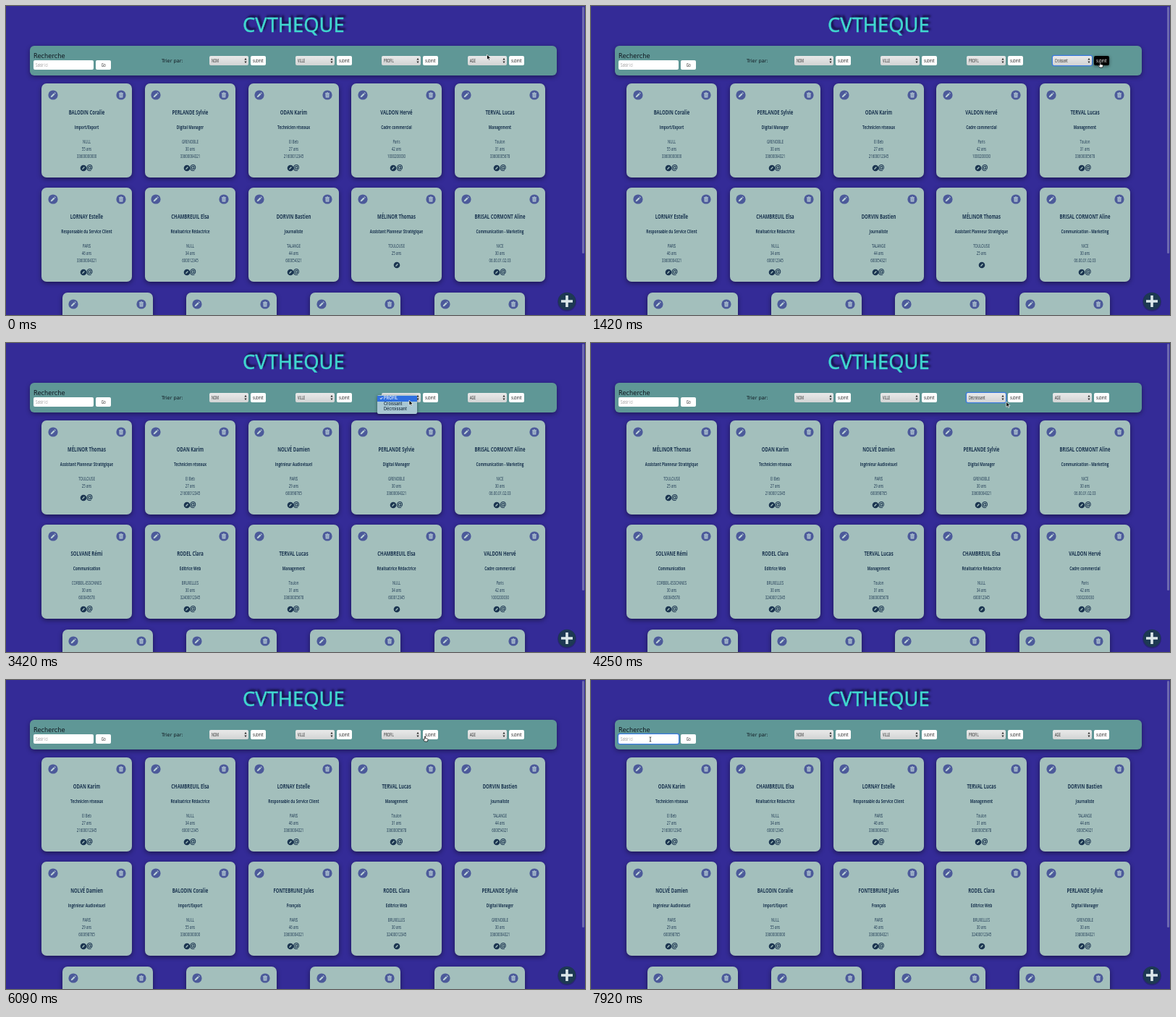
An HTML page for the animation above (8000 ms loop, 800 px wide and 427 px high).

```html
<!DOCTYPE html>
<html lang="fr">
<head>
<meta charset="utf-8">
<title>CVTHEQUE</title>
<style>
html, body { margin: 0; width: 100%; height: 100%; overflow: hidden; background: #342b97; }
#stage { position: relative; width: 800px; height: 427px; overflow: hidden; color: #1b3550;
  font: 6.9px/10px "Open Sans", "Noto Sans", sans-serif; }
#stage div, #stage svg { position: absolute; box-sizing: border-box; white-space: nowrap; }
#title { left: 327px; top: 6px; font: 27.3px/40px "Noto Sans", sans-serif; color: #40d8cf;
  -webkit-text-stroke: .4px #40d8cf; text-shadow: 3px -3px 3px #0c0c30; }
#bar { left: 33px; top: 55px; width: 728px; height: 41px; border-radius: 6px; background: #5f9796;
  box-shadow: 0 2px 6px #0006; }
.label { color: #101820; font-family: "DejaVu Sans", sans-serif; }
.narrow { display: inline-block; transform: scaleX(.64); }
.box { display: flex; justify-content: center; height: 13px; line-height: 13px; border-radius: 2px;
  background: #fff; color: #222; font-size: 7px; }
#search, .select { justify-content: flex-start; padding-left: 3px; }
#search .narrow, .select .narrow { transform-origin: left; }
#search { left: 38px; top: 75px; width: 83px; color: #999; }
.select { top: 69px; width: 54px; background: linear-gradient(#e9e9e9, #d2d4d4); font-size: 6.4px; }
.select svg { right: 2px; top: 3px; }
.submit { top: 69px; width: 21px; }
.submit.hover { background: #000; color: #fff; box-shadow: 0 1px 4px #0008; }
.focus { box-shadow: 0 0 0 1.3px #3c7be0; }
.card { width: 125px; height: 130px; border-radius: 7px; background: #a3bfbc; box-shadow: 0 2px 6px #0007; }
.card .narrow { width: 100%; text-align: center; }
.card .name { top: 33px; font-size: 9.3px; line-height: 13px; font-weight: 700; }
.card .job { top: 55px; font-size: 7.4px; font-weight: 700; }
.card .at { left: 62px; font: 700 10px/10px "Noto Sans", sans-serif; }
#menu { top: 72px; width: 55px; height: 26px; padding-top: 1px; border-radius: 2px; background: #a9c7d3;
  box-shadow: 0 1px 4px #0007; color: #14283c; font: 500 5.6px/7.7px Inter, sans-serif; }
#menu div { position: static; padding-left: 9px; }
#menu .on { background: #2f6fe0; color: #fff; }
#menu div:first-child::before { content: "✓"; position: absolute; left: 3px; font-weight: 700; }
#thumb { left: 796px; top: 1px; width: 3px; height: 341px; border-radius: 2px; background: #6d69b0; }
</style>
</head>
<body>
<svg width="0" height="0" style="position:absolute">
  <symbol id="pencil" viewBox="-7 -7 14 14"><circle r="6.6" fill="#4c5a9a"/>
    <path d="M-3.3 3.3l.5-2.1 3.8-3.8 1.6 1.6-3.8 3.8zM1.6-3.2l.7-.6 1.6 1.6-.7.6z" fill="#b9cfd6"/></symbol>
  <symbol id="trash" viewBox="-7 -7 14 14"><circle r="6.6" fill="#4c5a9a"/>
    <path d="M-3-3.1h2l.4-.7h1.2l.4.7h2v.8h-6zM-2.6-1.8h5.2l-.3 5.4h-4.6z" fill="#b9cfd6"/>
    <path d="M-1.1-.9v3.5M0-.9v3.5M1.1-.9v3.5" stroke="#4c5a9a" stroke-width=".45"/></symbol>
  <symbol id="compass" viewBox="-5 -5 10 10"><circle r="4.3" fill="#1b3550"/>
    <path d="M-2 2l.5-1.5 2.4-2.4 1 1-2.4 2.4z" fill="#a3bfbc"/></symbol>
  <symbol id="arrows" viewBox="0 0 4 7"><path d="M2 0l1.6 2.6H.4zM2 7L.4 4.4h3.2z" fill="#222"/></symbol>
</svg>
<div id="stage">
  <div id="title">CVTHEQUE</div>
  <div id="bar"></div>
  <div class="label" style="left:38px;top:64px;font-size:8.3px">Recherche</div>
  <div class="box" id="search"><span class="narrow">Saisir ici</span></div>
  <div class="box" style="left:124px;top:75px;width:21px"><span class="narrow">Go</span></div>
  <div class="label" style="left:215px;top:71px;font-size:6.6px">Trier par:</div>
  <div id="sorts"></div>
  <div id="cards"></div>
  <div id="menu"></div>
  <div id="thumb"></div>
  <svg style="left:759px;top:392px" width="32" height="32" viewBox="-16 -16 32 32">
    <circle cy="1" r="13" fill="#0003"/><circle r="12.2" fill="#1d3953"/>
    <path d="M-8 0H8M0-8V8" stroke="#dbe8ea" stroke-width="3.6"/></svg>
  <svg id="cursor" width="16" height="16" viewBox="-5 -5 16 16">
    <path stroke-width=".7" stroke-linejoin="round"/></svg>
</div>
<script>
const $ = id => document.getElementById(id);
const icon = (id, x, y, w, h = w) =>
  `<svg style="left:${x - w / 2}px;top:${y - h / 2}px" width="${w}" height="${h}"><use href="#${id}"/></svg>`;

const people = {
  ba: ["BALODIN Coralie", "Import/Export", "NULL", 55, "33600000000"],
  pe: ["PERLANDE Sylvie", "Digital Manager", "GRENOBLE", 30, "33600004321"],
  od: ["ODAN Karim", "Technicien réseaux", "El Beb", 27, "21600012345"],
  va: ["VALDON Hervé", "Cadre commercial", "Paris", 42, "1000200030"],
  te: ["TERVAL Lucas", "Management", "Toulon", 31, "33600005678"],
  lo: ["LORNAY Estelle", "Responsable du Service Client", "PARIS", 46, "33600004321"],
  ch: ["CHAMBREUIL Elsa", "Réalisatrice Rédactrice", "NULL", 34, "600012345"],
  do: ["DORVIN Bastien", "Journaliste", "TALANGE", 44, "600054321"],
  me: ["MÉLINOR Thomas", "Assistant Planneur Stratégique", "TOULOUSE", 25, ""],
  br: ["BRISAL CORMONT Aline", "Communication - Marketing", "NICE", 30, "06.00.01.02.03"],
  no: ["NOLVÉ Damien", "Ingénieur Audiovisuel", "PARIS", 29, "600098765"],
  so: ["SOLVANE Rémi", "Communication", "CORBEIL-ESSONNES", 30, "600045678"],
  ro: ["RODEL Clara", "Editrice Web", "BRUXELLES", 30, "32400012345"],
  fo: ["FONTEBRUNE Jules", "Français", "PARIS", 46, "33600004321"],
};
const orders = [
  "ba pe od va te lo ch do me br",
  "me od no pe br so ro te ch va",
  "od ch lo te do no ba fo ro pe",
].map(s => s.split(" "));

const sorts = ["NOM", "VILLE", "PROFIL", "AGE"];
const AGE = 3, PROFIL = 2;
$("sorts").innerHTML = sorts.map((name, i) => `
  <div class="box select" style="left:${281 + 119 * i}px"><span class="narrow">${name}</span>
    <svg width="4" height="7"><use href="#arrows"/></svg></div>
  <div class="box submit" style="left:${337.5 + 119 * i}px"><span class="narrow">submit</span></div>`).join("");
const selects = [...document.querySelectorAll(".select")];
const submits = [...document.querySelectorAll(".submit")];

function card(x, y, person, single) {
  let body = "";
  if (person) {
    const [name, job, city, age, phone] = person, iconY = phone ? 116.5 : 106.5;
    body = `<div class="narrow name">${name}</div><div class="narrow job">${job}</div>` +
      [city, age + " ans", phone]
        .map((s, i) => `<div class="narrow" style="top:${75.5 + 10.2 * i}px">${s}</div>`).join("") +
      icon("compass", single ? 62.5 : 58, iconY, 10) +
      (single ? "" : `<div class="at" style="top:${iconY - 6}px">@</div>`);
  }
  return `<div class="card" style="left:${x}px;top:${y}px">` +
    icon("pencil", 15.5, 16, 14) + icon("trash", 109.5, 16, 14) + body + `</div>`;
}

const pages = orders.map(order =>
  order.map((id, i) => card(49 + 142.8 * (i % 5), i < 5 ? 107 : 251.3, people[id], i === 8)).join("") +
  [0, 1, 2, 3].map(i => card(77.6 + 171.3 * i, 395.5)).join(""));

const shapes = {
  arrow: ["M0 0V7.2L1.7 5.7 2.9 8.3 4 7.8 2.9 5.3H5.2Z", "#000", "#fff"],
  hand: ["M-.6 0Q0-.8.6 0V2.6L3.5 3.2Q4.2 3.5 4 4.5L3.3 7H-.6L-2.6 4.2Q-2.4 3.2-.6 4.3Z", "#fff", "#000"],
  beam: ["M-1.3-3.2Q0-3.2 0-2.4Q0-3.2 1.3-3.2M0-2.4V2.4M-1.3 3.2Q0 3.2 0 2.4Q0 3.2 1.3 3.2", "none", "#000"],
};

// Cursor stops: time, x, y
const path = [
  [0, 664.5, 67], [170, 664.5, 67], [420, 668, 74], [550, 668, 75], [750, 666, 84], [900, 666, 84],
  [1300, 703.5, 78], [2250, 703.5, 78], [2950, 557, 76], [3300, 557, 78], [3430, 557, 79], [3750, 552, 91],
  [3950, 552, 91], [4450, 585.5, 76], [5700, 585.5, 76], [6050, 579, 78], [6300, 579, 78],
  [7250, 82, 82], [8000, 82, 82],
];
function cursorAt(t) {
  const i = path.findIndex(p => p[0] > t), [t0, x0, y0] = path[i - 1], [t1, x1, y1] = path[i];
  const u = (t - t0) / (t1 - t0), e = u * u * (3 - 2 * u);
  return [x0 + (x1 - x0) * e, y0 + (y1 - y0) * e];
}

const within = (t, a, b) => t >= a && t < b;
let shownPage = -1;

function render(t) {
  const page = t < 1880 ? 0 : t < 5250 ? 1 : 2;
  if (page !== shownPage) $("cards").innerHTML = pages[shownPage = page];

  const [x, y] = cursorAt(t);
  const open = within(t, 480, 880) ? AGE : within(t, 3150, 3900) ? PROFIL : -1;
  const chosen = { [AGE]: within(t, 880, 1880) && "Croissant", [PROFIL]: within(t, 3900, 5250) && "Décroissant" };
  const focused = within(t, 880, 1600) ? AGE : within(t, 3900, 4850) ? PROFIL : -1;
  const overButton = i => within(x, 337.5 + 119 * i, 358.5 + 119 * i) && within(y, 69, 82);

  sorts.forEach((name, i) => {
    selects[i].firstChild.textContent = chosen[i] || name;
    selects[i].classList.toggle("focus", focused === i);
    submits[i].classList.toggle("hover", !!chosen[i] && overButton(i));
  });
  $("search").classList.toggle("focus", t >= 7500);
  $("thumb").hidden = within(t, 1650, 1960) || within(t, 4950, 5330);

  $("menu").hidden = open < 0;
  if (open >= 0) {
    const row = y < 80.5 ? 0 : y < 88 ? 1 : 2;
    $("menu").style.left = 275 + 119 * open + "px";
    $("menu").innerHTML = [sorts[open], "Croissant", "Décroissant"]
      .map((s, i) => `<div class="${i === row ? "on" : ""}">${s}</div>`).join("");
  }

  // The pointer stays an arrow after the first reload until it moves
  const pointing = open < 0 && !within(t, 1880, 2300) && sorts.some((_, i) => overButton(i));
  const kind = x < 121 && y > 75 ? "beam" : pointing ? "hand" : "arrow";
  const [d, fill, stroke] = shapes[kind], shape = $("cursor").firstElementChild;
  shape.setAttribute("d", d);
  shape.setAttribute("fill", fill);
  shape.setAttribute("stroke", stroke);
  $("cursor").style.transform = `translate(${x - 5}px, ${y - 5}px)`;
}

function frame() {
  render(performance.now() % 8000);
  requestAnimationFrame(frame);
}
frame();
</script>
</body>
</html>
```
